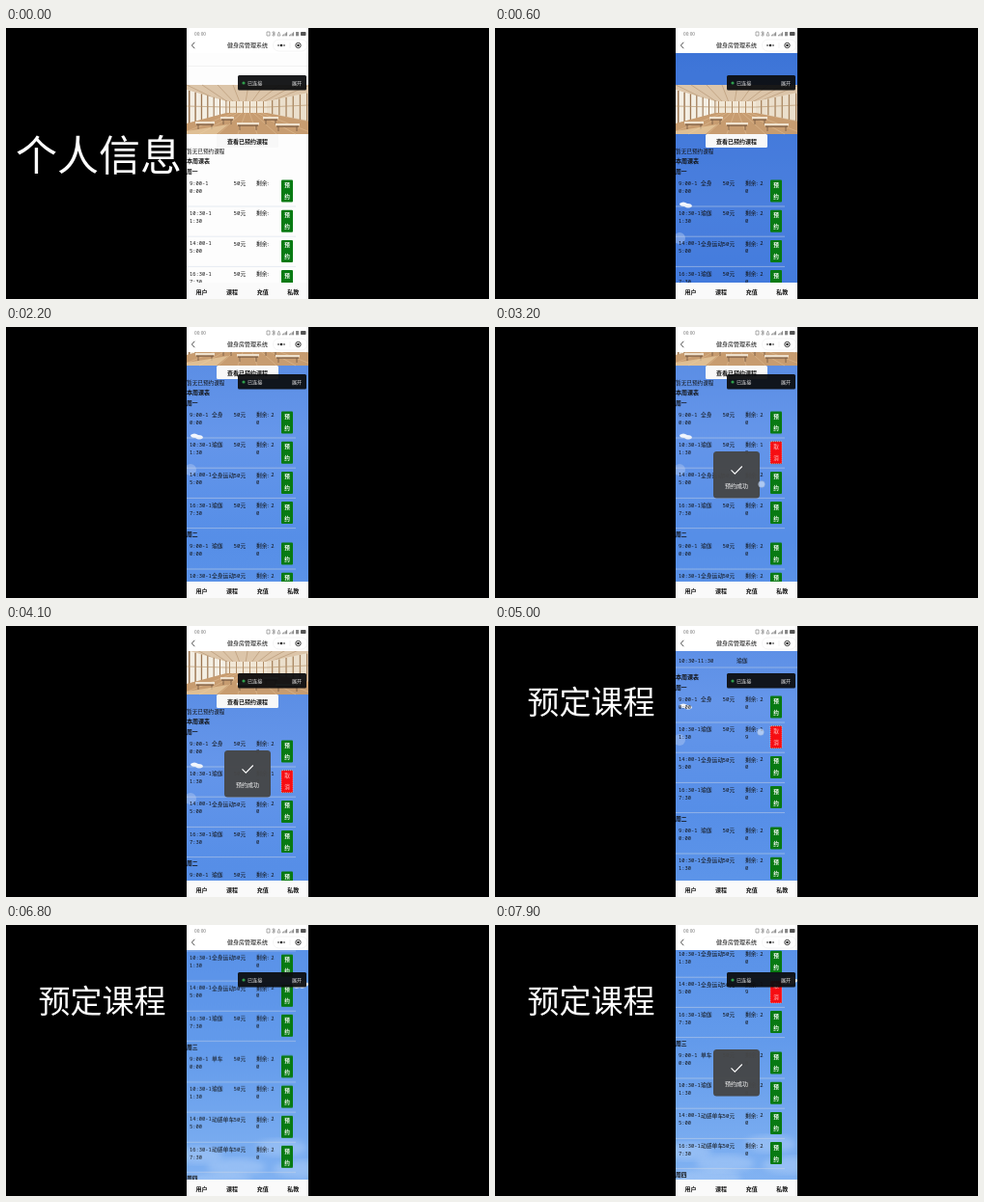
Animation, 500 px wide and 281 px high, one loop 8 s. Source, as an HTML page:

```html
<!DOCTYPE html>
<html lang="zh-CN">
<head>
<meta charset="utf-8">
<title>健身房管理系统</title>
<style>
  html, body { margin: 0; width: 100%; height: 100%; overflow: hidden; background: #000; }
  svg { display: block; width: 100vw; height: 100vh; }
  text { font-family: "Noto Sans CJK SC", "Noto Sans CJK", "Noto Sans", sans-serif; white-space: pre; }
  .mono { font-family: "Noto Sans Mono", "Noto Sans CJK SC", "Noto Sans CJK", monospace; }
  .b { font-weight: 700; }
  .m { font-weight: 500; }
  .mid { text-anchor: middle; }
  #page { animation: scroll 8s infinite cubic-bezier(.3, .2, .4, 1); }
  #list { animation: push 8s infinite step-end; }
  @keyframes scroll {
    0%, 17.5% { transform: translateY(0); }
    23%, 40% { transform: translateY(-70px); }
    46%, 57.5% { transform: translateY(-39px); }
    62.5%, 65% { transform: translateY(-100px); }
    73.75%, 78% { transform: translateY(-222px); }
    87%, 100% { transform: translateY(-313px); }
  }
  @keyframes push {
    0% { transform: translateY(0); }
    56.25%, 100% { transform: translateY(15px); }
  }
</style>
</head>
<body>
<script>
const LOOP = 8000;
let css = '', count = 0;

const pct = ms => (ms / LOOP * 100).toFixed(3) + '%';
const rect = (x, y, w, h, fill, more = '') =>
  `<rect x="${x}" y="${y}" width="${w}" height="${h}" fill="${fill}" ${more}/>`;
const line = (d, color, width = .5, more = '') =>
  `<path d="${d}" fill="none" stroke="${color}" stroke-width="${width}" ${more}/>`;
// y is the middle of the glyphs
const text = (x, y, size, str, cls = '', fill = '#111') =>
  `<text x="${x}" y="${(y + size * .37).toFixed(2)}" font-size="${size}" class="${cls}" fill="${fill}">${str}</text>`;

// Visible only between two times, with hard changes
function show(from, to, body) {
  const name = 'show' + count++;
  css += `@keyframes ${name}{0%{opacity:${from ? 0 : 1}}` +
    (from ? `${pct(from)}{opacity:1}` : '') +
    (to < LOOP ? `${pct(to)}{opacity:0}100%{opacity:0}` : '100%{opacity:1}') + '}';
  return `<g style="animation:${name} 8s infinite step-end">${body}</g>`;
}

function touch(from, to, x, y0, y1 = y0) {
  const name = 'drag' + count++;
  css += `@keyframes ${name}{0%,${pct(from + 100)}{transform:translate(${x}px,${y0}px)}` +
    `${pct(to)},100%{transform:translate(${x}px,${y1}px)}}`;
  return show(from, to, `<circle r="3.3" fill="#d9e6fa" fill-opacity=".65" stroke="#9eb4d6" stroke-width=".5"
    style="animation:${name} 8s infinite cubic-bezier(.3,.2,.4,1)"/>`);
}

function sky() {
  const cloud = (x, y, s) => `<path transform="translate(${x} ${y}) scale(${s})" fill="#f4f8ff"
    d="M-8 1q0-4 4-3 2-5 6-2 3-2 5 2 4 1 1 3-4 4-8 2-6 2-8-2z"/>`;
  const haze = [[200, 548, 24], [238, 560, 30], [285, 540, 26], [305, 562, 28], [220, 575, 35]]
    .map(([x, y, r]) => `<ellipse cx="${x}" cy="${y}" rx="${r}" ry="9" fill="#c4dcfb" opacity=".35" filter="url(#soft)"/>`).join('');
  return rect(187, 0, 126, 700, 'url(#sky)') +
    show(300, 1900, rect(187, 0, 126, 300, '#1c58c8', 'opacity=".35"')) +
    '<circle cx="191" cy="218" r="6" fill="#a9c4f2" opacity=".5"/>' +
    '<path d="M191 182q4-3 8 0 5 0 5 3-4 3-8 0-5 0-5-3z" fill="#f2f6fd"/>' +
    cloud(304, 371, 1) + haze;
}

function banner() {
  let s = rect(187, 59, 126, 51, 'url(#room)');
  s += '<path d="M187 59H313V68L268 76H228L187 64z" fill="#dcc5a9"/>';
  for (let i = 0; i < 9; i++)
    s += line(`M${187 + i * 16} 59L${224 + i * 6} 77`, '#b99a78', .7);
  s += '<path d="M187 64L228 76V89L187 99z" fill="#f4efe4"/><path d="M313 67L270 76V88L313 96z" fill="#ebdfcc"/>';
  s += rect(228, 76, 42, 12, '#f1e7d6');
  for (let i = 0; i < 7; i++) {
    const x = 189 + i * 6.4, h = 34 - i * 3.4;
    s += rect(x, 65 + i * 1.7, 1.5 - i * .1, h, '#9c7652');
  }
  for (let i = 0; i < 6; i++) {
    s += rect(231 + i * 7, 76, 1, 12, '#b08c66');
    s += rect(275 + i * 7.2, 75 - i * 1.5, 1.3, 14 + i * 3, '#a88560');
  }
  s += line('M187 81L228 82H270L313 80', '#b8976f', .7);
  s += '<path d="M187 99L228 88H270L313 97V110H187z" fill="#c79c70"/>';
  for (let i = 0; i < 8; i++)
    s += line(`M${236 + i * 4} 88L${180 + i * 20} 110`, '#dfbd92', .6);
  for (const [x, y, w] of [[196, 97, 20], [222, 92, 14], [239, 98, 23], [266, 92, 16], [279, 99, 25]])
    s += rect(x, y, w, 2.4, '#efe2cf') + rect(x + 1, y + 2.4, w - 2, 1.4, '#85654a') +
      line(`M${x + 3} ${y + 3}v5M${x + w - 3} ${y + 3}v5`, '#725740', .8);
  return s + '<path d="M187 107L230 100 218 110H187z" fill="#f1d7ac" opacity=".6"/>';
}

function button(y, label, fill, color, more = '') {
  return rect(285, y - 3.5, 12, 23, fill, 'rx="1" ' + more) +
    text(291, y + 2, 5.6, label[0], 'mid b', color) + text(291, y + 14, 5.6, label[1], 'mid b', color);
}

function lesson(y, [start, end], name, booked) {
  const left = n => text(271, y, 5.5, ' ' + n[0], 'mono') + text(259, y + 8, 5.5, n[1], 'mono');
  let s = text(190, y, 5.4, start, 'mono') + text(190, y + 8, 5.4, end, 'mono') +
    text(235.6, y, 5.7, '50元', 'mono') + text(259, y, 5.8, '剩余:') +
    line(`M187 ${y + 24}H300`, '#cfd8e6', .5) + button(y, '预约', '#087a13', '#fff') +
    show(300, LOOP, text(213, y, 5.8, name));
  if (!booked) return s + show(300, LOOP, left('20'));
  return s + show(300, booked, left('20')) +
    show(booked, LOOP, left('19') + button(y, '取消', '#f60d12', '#ff8d8d', 'stroke="#ffd0d0" stroke-width=".6" stroke-dasharray="1 1"'));
}

function timetable() {
  const times = [['9:00-1', '0:00'], ['10:30-1', '1:30'], ['14:00-1', '5:00'], ['16:30-1', '7:30']];
  const days = [
    ['周一', '全身', '瑜伽', '全身运动', '瑜伽'],
    ['周二', '瑜伽', '全身运动', '全身运动', '瑜伽'],
    ['周三', '单车', '瑜伽', '动感单车', '动感单车'],
    ['周四', '瑜伽', '全身', '瑜伽', '单车']
  ];
  const booked = { '0-1': 2800, '1-2': 7300 };
  return text(187, 138, 6, '本周课表', 'b') + days.map(([day, ...names], d) => {
    const y = 149 + d * 136;
    return text(187, y, 5.8, day, 'b') +
      names.map((n, i) => lesson(y + 12 + i * 31.2, times[i], n, booked[d + '-' + i])).join('');
  }).join('');
}

function page() {
  return rect(187, 0, 126, 700, '#fdfdfd') + line('M187 39.5H313', '#e6e6e6') +
    show(300, LOOP, sky()) + banner() +
    rect(218, 110, 64, 14, '#f8f8f8', 'rx="1.5"') + text(250, 117.3, 6, '查看已预约课程', 'mid b') +
    show(0, 4500, text(187, 128, 5.65, '暂无已预约课程')) +
    show(4500, LOOP, text(190, 136, 5.5, '10:30-11:30', 'mono') + text(250, 136, 5.8, '瑜伽') + line('M187 143H313', '#c3d0e6')) +
    `<g id="list">${timetable()}</g>`;
}

function chrome() {
  let s = rect(240, 49, 71, 15.5, '#0c0d0f', 'rx="1.5" opacity=".94"') +
    '<circle cx="246" cy="57" r="1.6" fill="#2f9e4b"/>' +
    text(250, 57, 5.1, '已连接', '', '#e4e4e4') + text(296, 57, 5.1, '展开', '', '#e4e4e4');
  s += rect(187, 0, 126, 26, '#fff') + text(195, 6, 4.8, '00:00', '', '#777');
  s += line('M270 4h3v4h-3zM275.5 4l3 3-1.5 1.5V3.5l1.5 1.5-3 3M281 8l1.5-4 1.5 4z', '#777', .6);
  for (const x of [286, 293])
    for (let i = 0; i < 4; i++) s += rect(x + i * 1.4, 7.3 - i, .9, 1 + i, '#777');
  s += rect(300, 4, 3, 4.3, '#888') + rect(305, 4, 5.5, 4, '#555', 'rx=".8"');
  s += line('M195.3 14.8L192.4 18 195.3 21.2', '#222', .8) + text(250, 18, 6, '健身房管理系统', 'mid m');
  s += rect(276.5, 12, 35.5, 12, '#fff', 'rx="6" stroke="#e8e8e8" stroke-width=".5"') + line('M294 15v6', '#ddd', .4);
  s += [[282, .8], [285, 1.3], [288, .8]].map(([x, r]) => `<circle cx="${x}" cy="18" r="${r}" fill="#111"/>`).join('');
  s += '<circle cx="302.5" cy="18" r="2.7" fill="none" stroke="#111" stroke-width=".8"/><circle cx="302.5" cy="18" r="1.2" fill="#111"/>';
  s += rect(187, 264, 126, 17, '#fafafa');
  return s + ['用户', '课程', '充值', '私教'].map((t, i) => text(202.5 + i * 31.6, 273.7, 6, t, 'mid b')).join('');
}

const toast = rect(226, 129, 48, 48.5, '#464748', 'rx="3.5" opacity=".97"') +
  line('M244.5 148.3L248.3 152.2 255.8 144.5', '#fff', 1.1) +
  text(250, 165, 6, '预约成功', 'mid', '#fff');

const touches = [
  [1300, 1840, 258, 237, 167], [2600, 2800, 291, 131], [3100, 3680, 276, 163, 194],
  [4300, 4500, 250, 79], [4500, 5100, 275, 169, 108], [5200, 5700, 275, 205, 110],
  [6240, 6800, 275, 190, 115], [7100, 7300, 291, 70]
].map(t => touch(...t)).join('');

const scene = `<svg viewBox="0 0 500 281" preserveAspectRatio="none">
  <defs>
    <linearGradient id="sky" gradientUnits="userSpaceOnUse" x1="0" y1="0" x2="0" y2="600">
      <stop offset="0" stop-color="#4d82dd"/><stop offset=".3" stop-color="#6596ea"/>
      <stop offset=".48" stop-color="#568ee7"/><stop offset=".72" stop-color="#629aeb"/>
      <stop offset="1" stop-color="#86b6f3"/>
    </linearGradient>
    <linearGradient id="room" x1="0" y1="0" x2="0" y2="1">
      <stop offset="0" stop-color="#d9c3a6"/><stop offset=".5" stop-color="#eadbc3"/><stop offset="1" stop-color="#b98d62"/>
    </linearGradient>
    <filter id="soft"><feGaussianBlur stdDeviation="3"/></filter>
    <clipPath id="phone"><rect x="187" y="0" width="126" height="281"/></clipPath>
  </defs>
  <rect width="500" height="281"/>
  ${show(0, 500, text(10, 132, 43, '个人信息', 'm', '#fff'))}
  ${show(4700, LOOP, text(33.5, 79, 33, '预定课程', 'm', '#fff'))}
  <g clip-path="url(#phone)">
    <g id="page">${page()}</g>
    ${chrome()}
    ${show(2800, 4300, toast)}${show(7300, LOOP, toast)}
    ${touches}
  </g>
</svg>`;

document.head.appendChild(document.createElement('style')).textContent = css;
document.body.innerHTML = scene;
</script>
</body>
</html>
```
